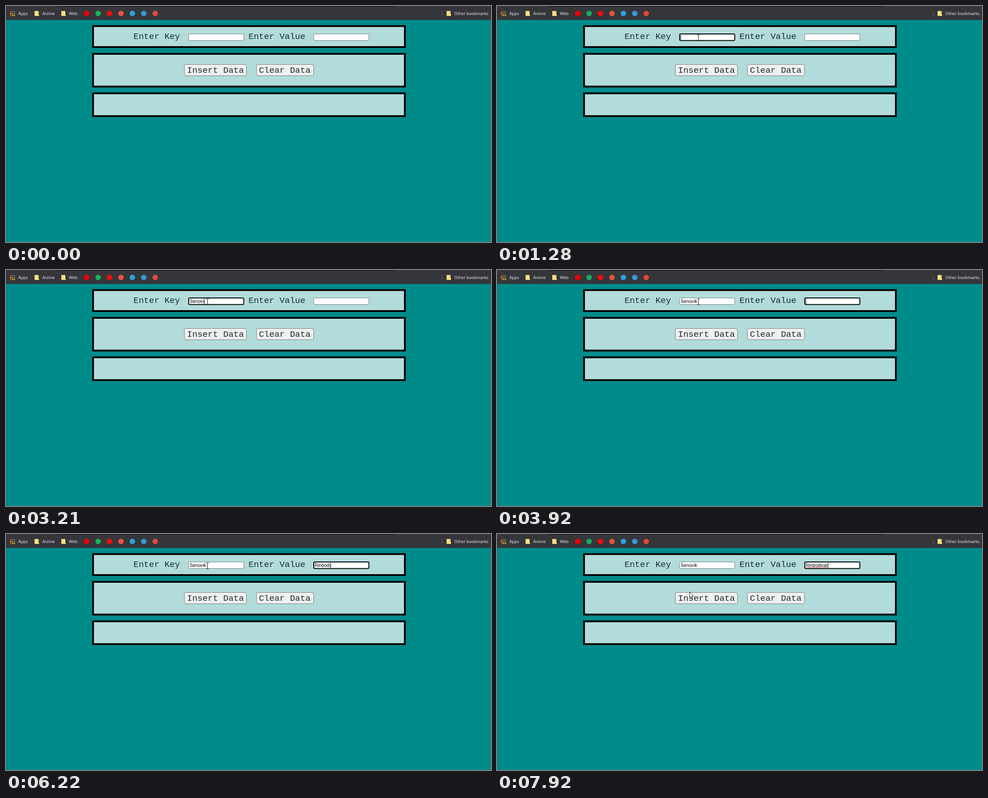
Recreate the animation shown at these times as an HTML page. Size 1070x523 px, loop 8000 ms.

```html
<!DOCTYPE html>
<html lang="en">
<head>
<meta charset="utf-8">
<title>Key and value form</title>
<style>
  html, body { margin: 0; width: 100%; height: 100%; overflow: hidden; background: #008b8b; }
  svg { display: block; width: 1070px; height: 523px; }
  .bar { font: 9.2px "Open Sans", "Noto Sans", sans-serif; fill: #f1f3f4; }
  .panel { fill: #b2dcdc; stroke: #000; stroke-width: 4; }
  .label { font: 19px "Liberation Mono", "Courier New", monospace; fill: #1c2b2b; }
  .button { fill: #efefef; stroke: #767676; }
  .input { fill: #fff; stroke: #767676; }
  .input.focus { stroke: #000; stroke-width: 2; }
  .typed { font: 10.2px "Liberation Sans", Arial, sans-serif; fill: #000; }
</style>
</head>
<body>
<svg viewBox="0 0 1070 523">
  <rect width="1070" height="523" fill="#008b8b"/>
  <rect width="1070" height="31" fill="#35363a"/>
  <path d="M112 0H859Q856 2 850 2H121Q115 2 112 0Z" fill="#202124"/>

  <g id="apps"></g>
  <defs>
    <path id="folder" d="M0 1.2Q0 0 1.2 0H7.5Q9 0 9 1.5V8L10 9V11H1.2Q0 11 0 9.8Z" fill="#fbdc84"/>
  </defs>
  <use href="#folder" x="63" y="11"/>
  <use href="#folder" x="122" y="11"/>
  <use href="#folder" x="972" y="11"/>
  <path d="M962.5 11V23" stroke="#5f6368"/>
  <g class="bar">
    <text x="27" y="20">Apps</text>
    <text x="80" y="20">Anime</text>
    <text x="139" y="20">Web</text>
    <text x="989" y="20">Other bookmarks</text>
  </g>
  <g id="sites"></g>

  <rect class="panel" x="192" y="44.5" width="688" height="46.5"/>
  <rect class="panel" x="192" y="106" width="688" height="72.5"/>
  <rect class="panel" x="192" y="193.5" width="688" height="50.5"/>

  <rect class="button" x="393.5" y="129.5" width="137" height="25" rx="2"/>
  <rect class="button" x="552.5" y="129.5" width="126" height="25" rx="2"/>
  <g class="label">
    <text x="281.3" y="73">Enter Key</text>
    <text x="535" y="73">Enter Value</text>
    <text x="399.5" y="148">Insert Data</text>
    <text x="558" y="148">Clear Data</text>
  </g>

  <rect class="input" id="keyBox" x="403" y="62" width="121.5" height="14.5" rx="2"/>
  <rect class="input" id="valueBox" x="679" y="62" width="121.5" height="14.5" rx="2"/>
  <text class="typed" id="keyText" x="405.3" y="72.6"></text>
  <text class="typed" id="valueText" x="681" y="72.6"></text>
  <path id="squiggle" fill="none" stroke="#e33" stroke-width=".9"/>
  <rect id="caret" y="64" width="1" height="11"/>

  <path id="arrow" d="M.5 .5V13L3.4 10.4L5.4 14.8L7.4 13.9L5.5 9.6H9.3Z" fill="#fff" stroke="#111" stroke-width=".9"/>
  <path id="beam" d="M-3 -6H-1Q0 -6 0 -5Q0 -6 1 -6H3M0 -5V6M-3 7H-1Q0 7 0 6Q0 7 1 7H3" fill="none" stroke="#111"/>
</svg>
<script>
const LOOP = 8000;
const $ = id => document.getElementById(id);
const show = (id, on) => $(id).setAttribute("visibility", on ? "visible" : "hidden");

const appColors = ["#ea4335", "#ea4335", "#34a853", "#fbbc04", "#34a853", "#4285f4", "#ea4335", "#fbbc04", "#fbbc04"];
$("apps").innerHTML = appColors.map((color, i) =>
  `<rect x="${9 + i % 3 * 4}" y="${11.5 + Math.floor(i / 3) * 4}" width="2.8" height="2.8" fill="${color}"/>`).join("");

const siteColors = ["#f00000", "#19ae5b", "#f20c0c", "#e6533f", "#2ba3dc", "#3698d3", "#e4473b"];
$("sites").innerHTML = siteColors.map((color, i) =>
  `<circle cx="${178 + i * 25.2}" cy="16.5" r="6" fill="${color}"/>`).join("");

$("squiggle").setAttribute("d", "M" + Array.from({ length: 33 }, (_, i) =>
  `${681.5 + i * 1.5} ${i % 2 ? 73.6 : 75.2}`).join("L"));

const fields = {
  key: { text: "Senovik", times: [2120, 2350, 2670, 2900, 3140, 3210, 3610] },
  value: { text: "Rinbodivar", times: [4750, 5080, 5380, 5530, 5700, 5990, 6220, 6450, 6680, 6850] }
};
const FOCUS_KEY = 1280, FOCUS_VALUE = 3920, SPELLCHECK = 7620;
const caretSpans = [[1280, 1830], [2120, 4470], [4750, 7380], [7850, LOOP]];

// Pointer poses: start time, x, y, shape
const poses = [
  [260, 895, 512, "arrow"], [340, 800, 425, "arrow"], [420, 680, 330, "arrow"],
  [490, 560, 240, "arrow"], [570, 455, 165, "arrow"], [650, 390, 118, "arrow"],
  [720, 377, 98, "arrow"], [800, 411.5, 84, "arrow"], [880, 425, 79, "arrow"],
  [960, 437.5, 70, "beam"], [1030, 441.5, 70, "beam"], [1120, 444.5, 70, "beam"],
  [7380, 440.5, 70, "beam"], [7470, 420.5, 72, "beam"], [7540, 385, 81, "arrow"],
  [7620, 352, 94, "arrow"], [7700, 342, 107, "arrow"], [7770, 360, 118, "arrow"],
  [7850, 396, 125, "arrow"], [7920, 424.5, 128, "arrow"]
];

function drawPointer(t) {
  const pose = poses.filter(p => p[0] <= t).pop();
  for (const shape of ["arrow", "beam"]) show(shape, pose && pose[3] === shape);
  if (pose) $(pose[3]).setAttribute("transform", `translate(${pose[1]} ${pose[2]})`);
}

function drawFields(t) {
  const focus = t >= FOCUS_VALUE ? "value" : t >= FOCUS_KEY ? "key" : "";
  for (const [name, { text, times }] of Object.entries(fields)) {
    $(name + "Text").textContent = text.slice(0, times.filter(at => at <= t).length);
    $(name + "Box").classList.toggle("focus", name === focus);
  }
  if (focus) {
    const node = $(focus + "Text");
    const end = node.x.baseVal[0].value + node.getComputedTextLength();
    $("caret").setAttribute("x", Math.round(end + .2));
  }
  show("caret", caretSpans.some(([from, to]) => t >= from && t < to));
  show("squiggle", t >= SPELLCHECK);
}

const start = performance.now();
function draw() {
  const t = (performance.now() - start) % LOOP;
  drawFields(t);
  drawPointer(t);
  requestAnimationFrame(draw);
}
draw();
</script>
</body>
</html>
```
